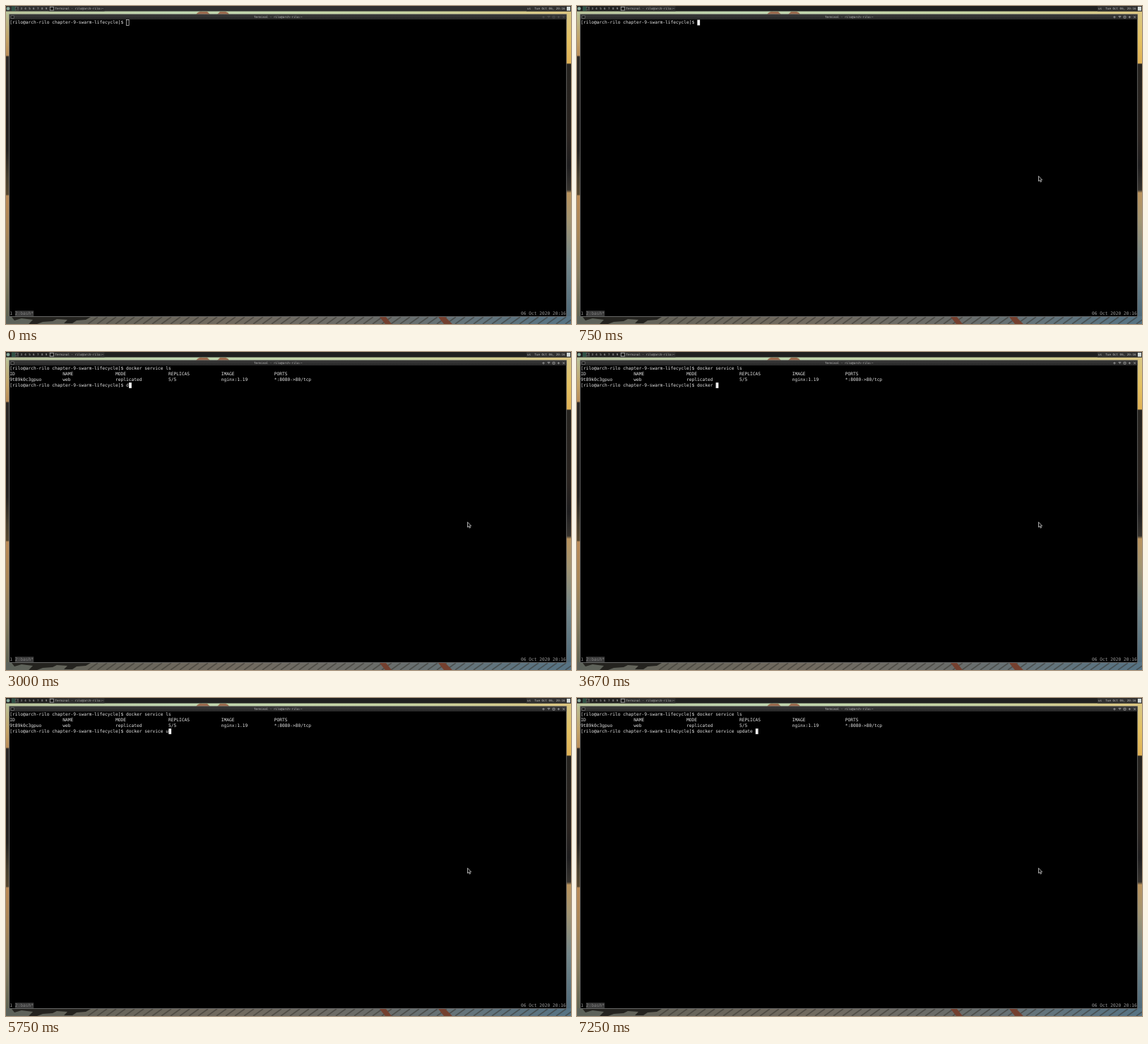
Animation, 800 px wide and 450 px high, one loop 8000 ms. Source, as an HTML page:

```html
<!DOCTYPE html>
<html lang="en">
<head>
<meta charset="utf-8">
<title>Terminal session</title>
<style>
  html, body { margin: 0; width: 100%; height: 100%; overflow: hidden; background: #000; }
  svg { display: block; width: 800px; height: 450px; }
  text { font-family: "DejaVu Sans Mono", monospace; white-space: pre; text-rendering: geometricPrecision; }
  .term { font-size: 6.23px; fill: #e6e6e6; }
  .small { font-size: 4.24px; fill: #bcbcbc; }
  .status { fill: #9c9c9c; }
  .tab { fill: #828282; }
</style>
</head>
<body>
<svg viewBox="0 0 800 450" xmlns="http://www.w3.org/2000/svg">
  <defs>
    <linearGradient id="topSky">
      <stop offset="0" stop-color="#b9c39a"/>
      <stop offset=".3" stop-color="#bfd6b0"/>
      <stop offset=".7" stop-color="#c6d3a2"/>
      <stop offset="1" stop-color="#dcc680"/>
    </linearGradient>
    <linearGradient id="leftShore" x2="0" y2="1">
      <stop offset="0" stop-color="#b9bd92"/>
      <stop offset=".08" stop-color="#c3a468"/>
      <stop offset=".135" stop-color="#b98d58"/>
      <stop offset=".14" stop-color="#2a2724"/>
      <stop offset=".36" stop-color="#211e1c"/>
      <stop offset=".45" stop-color="#24221f"/>
      <stop offset=".54" stop-color="#48402f"/>
      <stop offset=".595" stop-color="#57482f"/>
      <stop offset=".6" stop-color="#b98a56"/>
      <stop offset=".72" stop-color="#a98657"/>
      <stop offset=".86" stop-color="#857b5e"/>
      <stop offset="1" stop-color="#5f6352"/>
    </linearGradient>
    <linearGradient id="rightShore" x2="0" y2="1">
      <stop offset="0" stop-color="#d8c684"/>
      <stop offset=".08" stop-color="#e4c262"/>
      <stop offset=".16" stop-color="#e0b256"/>
      <stop offset=".165" stop-color="#25231f"/>
      <stop offset=".4" stop-color="#2a2420"/>
      <stop offset=".5" stop-color="#1e1d1e"/>
      <stop offset=".58" stop-color="#35322d"/>
      <stop offset=".59" stop-color="#b9935d"/>
      <stop offset=".68" stop-color="#a39572"/>
      <stop offset=".82" stop-color="#74878a"/>
      <stop offset="1" stop-color="#4f6a7a"/>
    </linearGradient>
    <linearGradient id="dock">
      <stop offset="0" stop-color="#5c625a"/>
      <stop offset=".15" stop-color="#66645a"/>
      <stop offset=".4" stop-color="#716a5f"/>
      <stop offset=".66" stop-color="#6a6c69"/>
      <stop offset=".82" stop-color="#64747b"/>
      <stop offset="1" stop-color="#567384"/>
    </linearGradient>
    <linearGradient id="titleFill" x2="0" y2="1">
      <stop offset="0" stop-color="#3b3b3b"/>
      <stop offset="1" stop-color="#262626"/>
    </linearGradient>
  </defs>

  <rect width="800" height="13" fill="url(#topSky)"/>
  <path d="M269 12q4-5 9-4h7l4 4zM299 12l4-4h8q4 1 5 4z" fill="#9a6b4e"/>
  <rect y="12" width="5" height="428" fill="url(#leftShore)"/>
  <rect x="793" y="12" width="7" height="428" fill="url(#rightShore)"/>
  <rect y="439" width="800" height="11" fill="url(#dock)"/>
  <path id="planks" stroke="#38352f" stroke-width="1.6" opacity=".55"/>
  <path d="M8 440h112l-7 4-13 1-6 4H82l5-5-15-1-6 3-14 1-8 3H32l6-6-16-2-10 3z" fill="#24231f"/>
  <path d="M529 440h9l8 10h-9zM612 440h10l10 10h-12z" fill="#74402f"/>

  <rect id="panel" width="800" height="7.5"/>
  <rect x="737" width="63" height="7.5" fill="#303030"/>
  <rect x="60.5" width="79" height="7.4" fill="#2d2d2d"/>
  <circle cx="3" cy="3.7" r="2.4" fill="#86a99c"/>
  <rect x="8" y=".5" width="5" height="6.5" fill="#2f5044"/>
  <rect x="13.5" y="1.2" width="4" height="4.8" fill="#111" stroke="#888" stroke-width=".5"/>
  <g id="desktops"></g>
  <rect x="62.3" y="1.3" width="5" height="4.8" fill="#181818" stroke="#c0c0c0" stroke-width=".7"/>
  <text class="small" id="taskTitle" x="69.5" y="5.2"></text>
  <text class="small" x="738" y="5.2">us</text>
  <text class="small" x="748.3" y="5.2">Tue Oct 06, 20:16</text>
  <rect x="794" y="1" width="5" height="5.6" fill="#d3dad8"/>

  <rect x="4.6" y="11.8" width="789.1" height="427.7" fill="#000" stroke="#747474" stroke-width=".8"/>
  <rect x="5" y="12.2" width="788.3" height="6.9" fill="url(#titleFill)"/>
  <rect x="7" y="13.8" width="4.2" height="3.8" fill="#161616" stroke="#888" stroke-width=".6"/>
  <text class="small" id="winTitle" x="351" y="17.1"></text>
  <path id="buttons" fill="none" stroke="#b4b4b4" stroke-width=".7"
    d="M761 13.9v3.6M759.3 15.7h3.4M767 14.4h3l-1.5 2.2zM774.2 14.3h2.8v2.8h-2.8zM780.8 15.7h3.2M782.4 14.1v3.2M788.2 14.3l2.8 2.8M791 14.3l-2.8 2.8"/>

  <g id="lines"></g>
  <rect id="cursor" width="3.8" height="7.9" stroke-width=".7"/>

  <rect x="12.8" y="431.2" width="26.4" height="7.9" fill="#3a3a3a"/>
  <g id="statusBar"></g>

  <path id="pointer" d="M0 0v7.3l1.7-1.5 1.2 2.6 1.2-.6-1.1-2.4h2.2z" fill="#111" stroke="#e6e6e6" stroke-width=".7"/>
</svg>
<script>
const LOOP = 8000;
const LEFT = 5.3, TOP = 19.5, CELL = 3.75, ROW = 95 / 12, BASELINE = 5.85;
const PROMPT = "[rilo@arch-rilo chapter-9-swarm-lifecycle]$ ";
const TITLE = "Terminal - rilo@arch-rilo:~";
const LIST = "docker service ls";
const FOCUS_AT = 160, RECALL_AT = 1330, RUN_AT = 2000, OUTPUT_AT = 2250;

const columns = cells => cells.map(c => c.padEnd(20)).join("").trimEnd();
const TABLE = [
  columns(["ID", "NAME", "MODE", "REPLICAS", "IMAGE", "PORTS"]),
  columns(["9t89k0c3gpuo", "web", "replicated", "5/5", "nginx:1.19", "*:8080->80/tcp"])
];

// Second command as typed, with a slip that is deleted again
const TYPING = [
  [3000, "d"], [3080, "do"], [3170, "doc"], [3330, "dock"], [3420, "docke"],
  [3670, "docker "], [3830, "docker s"], [3920, "docker se"], [4170, "docker ser"],
  [4420, "docker service "], [5750, "docker service u"], [5920, "docker service udp"],
  [6080, "docker service udpa"], [6420, "docker service udp"], [6580, "docker service ud"],
  [6670, "docker service u"], [6830, "docker service up"], [6920, "docker service upd"],
  [7250, "docker service update "]
];

const $ = id => document.getElementById(id);
function addText(parent, className, x, y, content = "") {
  const node = document.createElementNS("http://www.w3.org/2000/svg", "text");
  node.setAttribute("class", className);
  node.setAttribute("x", x);
  node.setAttribute("y", y);
  node.textContent = content;
  parent.append(node);
  return node;
}
const addCells = (parent, className, column, row, content) =>
  addText(parent, className, LEFT + column * CELL, TOP + row * ROW + BASELINE, content);

$("taskTitle").textContent = $("winTitle").textContent = TITLE;
for (let i = 2; i <= 9; i++) addText($("desktops"), "small", 26.3 + (i - 4) * 5.9, 5.2, i);
const rows = [0, 1, 2, 3].map(i => addCells($("lines"), "term", 0, i));

addCells($("statusBar"), "term status", 0, 52, "1");
addCells($("statusBar"), "term tab", 2, 52, "2:bash*");
addCells($("statusBar"), "term status", 193, 52, "06 Oct 2020 20:16");

let planks = "";
for (let x = 130; x < 810; x += 13) planks += `M${x} 440l-14 10`;
$("planks").setAttribute("d", planks);

function screenAt(t) {
  if (t < RECALL_AT) return [PROMPT];
  if (t < RUN_AT) return [PROMPT + LIST];
  if (t < OUTPUT_AT) return [PROMPT + LIST, ""];
  const typed = TYPING.filter(([at]) => at <= t).pop();
  return [PROMPT + LIST, ...TABLE, PROMPT + (typed ? typed[1] : "")];
}

function render(t) {
  const screen = screenAt(t);
  rows.forEach((node, i) => {
    const line = screen[i] || "";
    if (node.textContent !== line) node.textContent = line;
  });

  const focused = t >= FOCUS_AT;
  const last = screen.length - 1;
  const cursor = $("cursor");
  cursor.setAttribute("x", LEFT + screen[last].length * CELL);
  cursor.setAttribute("y", TOP + last * ROW);
  cursor.setAttribute("fill", focused ? "#f0f0f0" : "none");
  cursor.setAttribute("stroke", focused ? "none" : "#d8d8d8");
  $("buttons").setAttribute("opacity", focused ? 1 : 0.25);
  $("panel").setAttribute("fill", focused ? "#202020" : "#303030");

  const p = Math.min(1, Math.max(0, (t - 80) / 590));
  const away = (1 - p) ** 3;
  $("pointer").setAttribute("transform", `translate(${653.5 + 150 * away} ${240.7 + 30 * away})`);
}

const start = performance.now();
function tick() {
  render((performance.now() - start) % LOOP);
  requestAnimationFrame(tick);
}
render(0);
requestAnimationFrame(tick);
</script>
</body>
</html>
```
